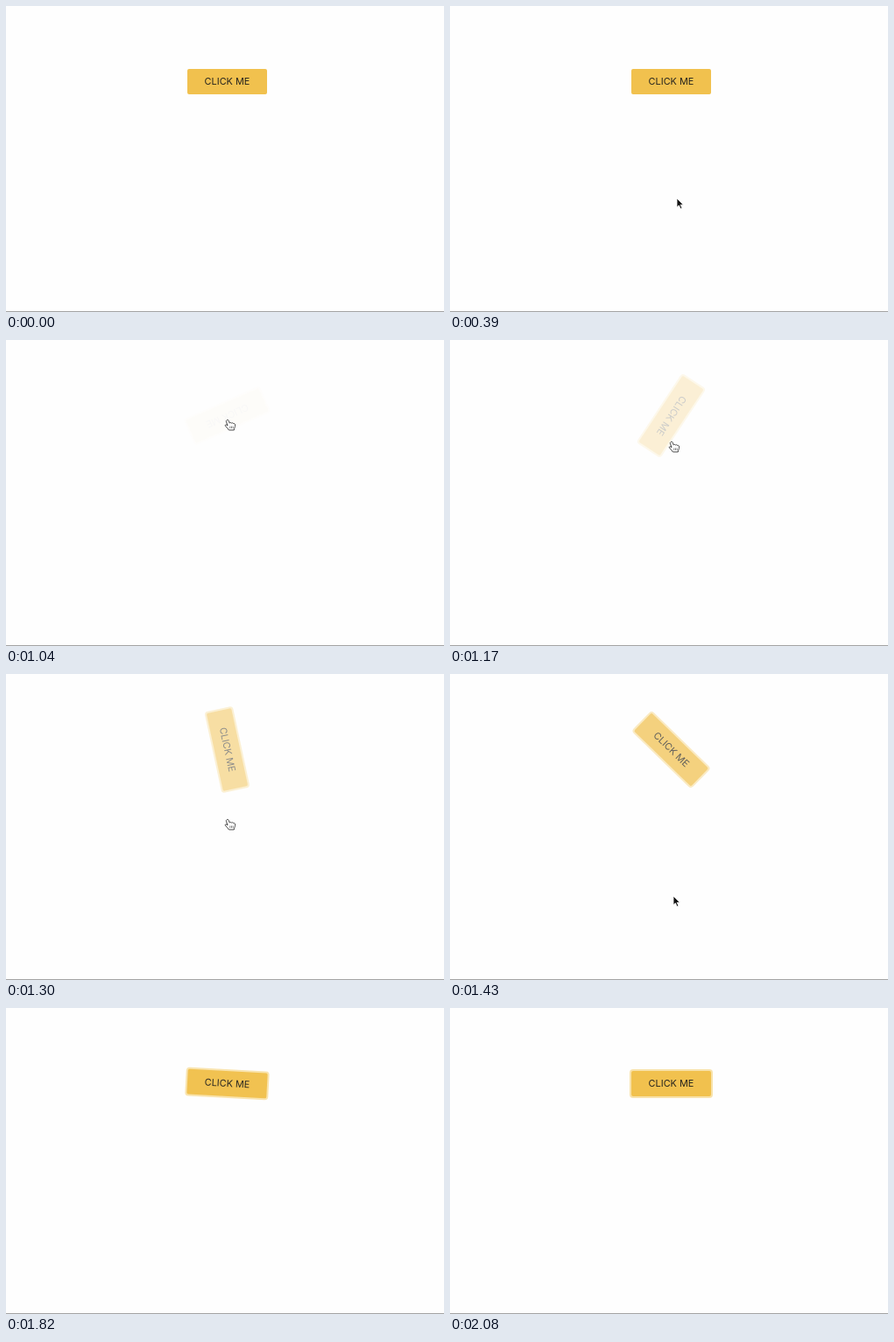
These frames come from a looping animation (500 by 350 pixels, 2210 ms). An HTML page:

```html
<!DOCTYPE html>
<html lang="en">
<head>
<meta charset="utf-8">
<title>Spinning button</title>
<style>
  html, body { margin: 0; width: 100%; height: 100%; overflow: hidden; background: #fefefe; }
  #stage { position: relative; width: 500px; height: 350px; overflow: hidden; }
  #rule { position: absolute; left: 0; top: 349px; width: 500px; height: 1px; background: #a3a3a3; }
  #button {
    position: absolute; left: 207px; top: 72px; width: 91px; height: 29px;
    border-radius: 2px; background: #f1c14e; color: #25231e;
    font: 400 10.9px/29px Inter, sans-serif; text-align: center; white-space: nowrap;
  }
  #button.focus { box-shadow: 0 0 0 2px rgba(244, 200, 90, .5); }
  svg { position: absolute; left: 0; top: 0; }
</style>
</head>
<body>
<div id="stage">
  <div id="rule"></div>
  <div id="button">CLICK ME</div>
  <svg width="500" height="350">
    <g id="arrow">
      <path d="M0 0V10.2L2.4 8L4.1 12L5.9 11.2L4.2 7.4H7.4Z" fill="#111" stroke="#fff" stroke-width=".8"/>
    </g>
    <g id="hand" stroke="#333" stroke-width=".9" stroke-linejoin="round">
      <path fill="#fff" d="M-4-5.3C-3.2-6-2.1-5.7-1.7-4.6L-.8-2C0-2.7 1-2.6 1.5-1.9C2.4-2.5 3.3-2.2 3.7-1.4C4.7-1.7 5.5-1 5.6 0C5.8 2 5 3.5 4.4 4.6V6H-1.6C-2.5 4.4-4 3.2-5.6 1.4C-6.2 .5-5.4-.4-4.4 .1L-3 1L-4.6-3.6C-4.8-4.3-4.6-5-4-5.3Z"/>
      <path fill="none" stroke-width=".6" d="M-.2 1.6V4M1.5 1.6V4M3.2 1.6V4"/>
    </g>
  </svg>
</div>
<script>
const LOOP = 2210, TICK = 130;
const SPIN = { start: 1000, length: 1000, angle: 160 };
const FILL = { rest: '#f1c14e', mid: '#e4b447', hover: '#d8a942' };

// tick: [pointer, x, y, button fill]
const pointer = {
  3: ['arrow', 259, 220, 'rest'],
  4: ['arrow', 258, 160, 'rest'],
  5: ['hand', 256, 101, 'mid'],
  6: ['hand', 256, 97, 'hover'],
  7: ['hand', 256, 97, 'hover'],
  8: ['hand', 256, 97, 'rest'],
  9: ['hand', 256, 122, 'rest'],
  10: ['hand', 256, 172, 'rest'],
  11: ['arrow', 255, 254, 'rest'],
  12: ['arrow', 255, 338, 'rest']
};

const $ = id => document.getElementById(id);
const button = $('button');
const bezier = (a, b, u) => 3 * a * u * (1 - u) ** 2 + 3 * b * u * u * (1 - u) + u ** 3;

// cubic-bezier(.25, .1, .25, 1)
function ease(x) {
  let lo = 0, hi = 1;
  for (let i = 0; i < 24; i++) {
    const mid = (lo + hi) / 2;
    if (bezier(.25, .25, mid) < x) lo = mid; else hi = mid;
  }
  return bezier(.1, 1, lo);
}

function draw(time) {
  const tick = Math.floor(time / TICK);
  const now = tick * TICK;
  const spinning = now >= SPIN.start;
  const x = Math.min(1, (now - SPIN.start) / SPIN.length);
  const p = spinning && x < 1 ? ease(x) : 1;
  const [kind, px, py, fill] = pointer[tick] || ['', 0, 0, 'rest'];

  button.style.transform = p < 1 ? `rotate(${SPIN.angle * (1 - p)}deg)` : 'none';
  button.style.opacity = p;
  button.style.background = FILL[fill];
  button.classList.toggle('focus', spinning);

  for (const id of ['arrow', 'hand']) {
    $(id).style.display = id === kind ? '' : 'none';
    $(id).setAttribute('transform', `translate(${px} ${py})`);
  }
}

const begin = performance.now();
function loop() {
  draw((performance.now() - begin) % LOOP);
  requestAnimationFrame(loop);
}
loop();
</script>
</body>
</html>
```
